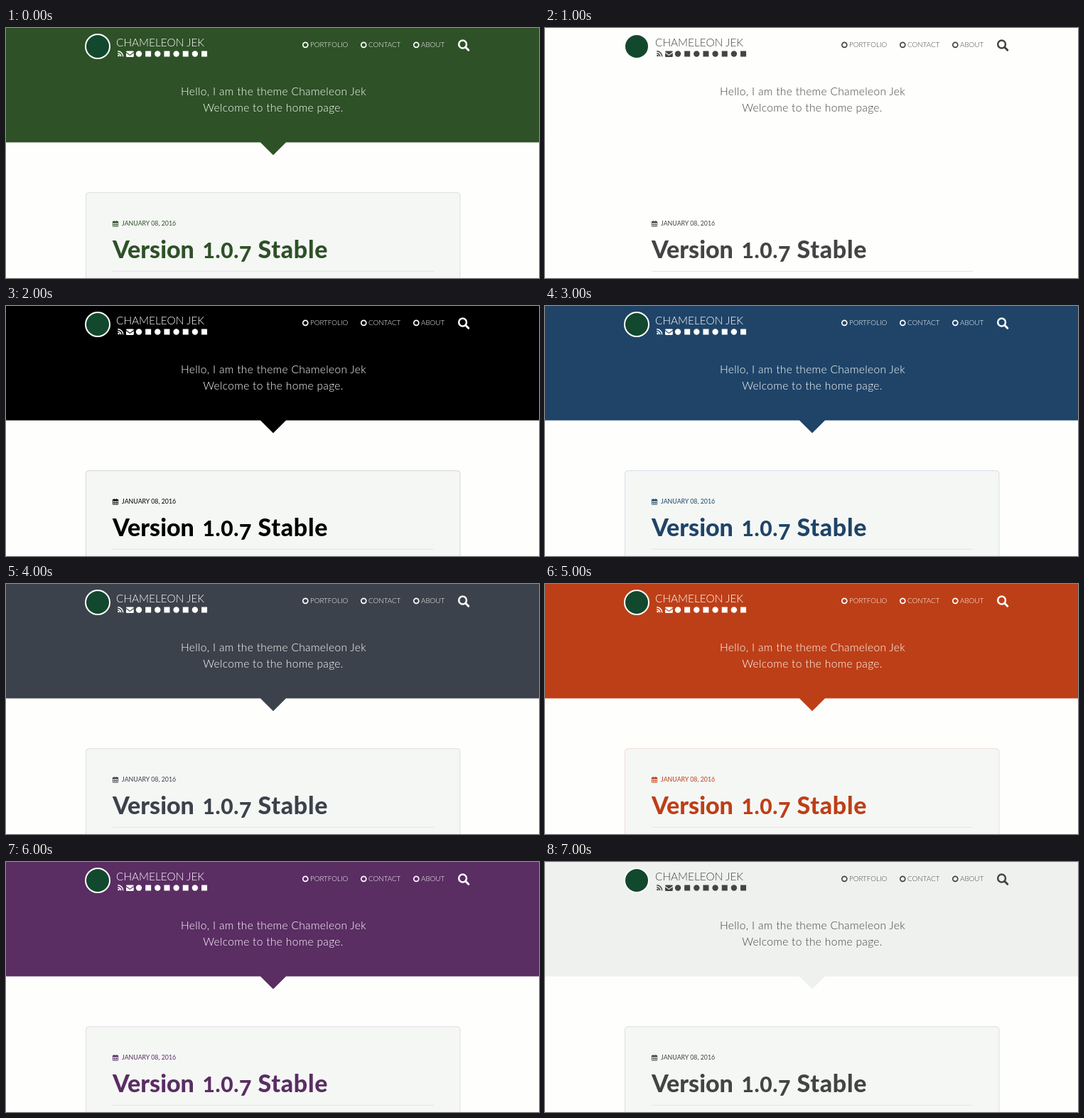
Write an HTML page that moves like this. It is 750 by 353 pixels and loops after 8 s.

```html
<!DOCTYPE html>
<html lang="en">
<head>
<meta charset="utf-8">
<title>Theme colours</title>
<style>
  html, body { margin: 0; width: 100%; height: 100%; overflow: hidden; background: #fefefd; }
  svg { display: block; width: 100%; height: 100%; font-family: Lato, sans-serif; font-weight: 300; }
  .band { fill: var(--band); }
  .ink { fill: var(--ink); }
  .line { fill: none; stroke: var(--ink); }
  .accent { fill: var(--accent); }
  .accent-line { fill: none; stroke: var(--accent); }
  .card { fill: #f5f7f5; stroke: var(--accent); stroke-opacity: .14; }
  .intro { font-size: 15.6px; letter-spacing: .3px; text-anchor: middle; }
  .nav { font-size: 9.8px; }
  .heading { font-size: 34px; font-weight: 800; }
</style>
</head>
<body>
<svg id="page" viewBox="0 0 750 353">
  <rect width="750" height="353" fill="#fefefd"/>
  <path class="band" d="M0 0H750V161.5H394L376 179.5L358 161.5H0Z"/>

  <circle cx="129" cy="26" r="17" fill="#12482d" stroke="#fff" stroke-width="2"/>
  <text class="ink" x="155" y="25.5" font-size="15.4">CHAMELEON JEK</text>

  <g id="icons" class="ink">
    <circle cx="158.5" cy="39" r="1.3"/>
    <path class="line" stroke-width="1.5" d="M157.2 35.8a4.5 4.5 0 0 1 4.5 4.5M157.2 32.8a7.5 7.5 0 0 1 7.5 7.5"/>
    <path d="M169 33.8q0-1.3 1.3-1.3h8.2q1.3 0 1.3 1.3l-5.4 3.9ZM169 35.2l5.4 3.9l5.4-3.9v4.5q0 1.3-1.3 1.3h-8.2q-1.3 0-1.3-1.3Z"/>
  </g>

  <g id="nav" class="ink nav"></g>
  <circle class="line" cx="642.6" cy="23" r="5.4" stroke-width="2.5"/>
  <path class="line" stroke-width="3" stroke-linecap="round" d="M647 27.5l3.8 3.8"/>

  <g class="ink intro">
    <text x="376.5" y="95">Hello, I am the theme Chameleon Jek</text>
    <text x="376" y="118">Welcome to the home page.</text>
  </g>

  <rect id="card" class="card" x="112.5" y="232.5" width="526.5" height="140" rx="4"/>
  <rect class="accent" x="150" y="273" width="8" height="2.2"/>
  <path class="accent-line" stroke-width=".8" d="M150.4 273.4h7.2v6.8h-7.2ZM152.8 275v5M155.2 275v5M150.4 277.7h7.2M152.3 271.8v2M155.7 271.8v2"/>
  <text class="accent" x="163" y="279.3" font-size="8.8" font-weight="400">JANUARY 08, 2016</text>
  <text class="accent heading" y="325"
    ><tspan x="150">Version</tspan> <tspan x="276.5" font-size="30" letter-spacing=".6">1.0.<tspan dy="5">7</tspan></tspan> <tspan x="354.5" dy="-5" letter-spacing=".7">Stable</tspan></text>
  <path d="M150 343.5H602" stroke="#e4e6e4"/>
</svg>
<script>
const page = document.getElementById("page");
const STEP = 1000;
const theme = (band, accent = band, ink = "#fff") => ({ band, accent, ink });
const themes = [
  theme("#2e5127"),
  theme("#fefefd", "#444", "#444"),
  theme("#000"),
  theme("#1f4468"),
  theme("#3c424b"),
  theme("#bd3f17"),
  theme("#5a2d63"),
  theme("#eff1ef", "#444", "#444"),
];
const PLAIN = 1;

function add(parent, tag, attributes, text = "") {
  const node = document.createElementNS("http://www.w3.org/2000/svg", tag);
  for (const name in attributes) node.setAttribute(name, attributes[name]);
  node.textContent = text;
  document.getElementById(parent).append(node);
}

// Plain marks for the social links, spaced evenly after the envelope.
[..."osososos"].forEach((shape, i) => {
  const x = 187 + i * 13.15;
  if (shape === "o") add("icons", "circle", { cx: x, cy: 36.5, r: 4.2 });
  else add("icons", "rect", { x: x - 4, y: 32.5, width: 8, height: 8 });
});

[["PORTFOLIO", 428], ["CONTACT", 510], ["ABOUT", 584]].forEach(([label, x]) => {
  add("nav", "circle", { class: "line", cx: x - 6.7, cy: 23.8, r: 3.5, "stroke-width": 1.7 });
  add("nav", "text", { x, y: 27 }, label);
});

const start = performance.now();
function draw(now) {
  const index = Math.floor(Math.max(0, now - start) / STEP) % themes.length;
  for (const [name, color] of Object.entries(themes[index])) page.style.setProperty("--" + name, color);
  document.getElementById("card").style.display = index === PLAIN ? "none" : "";
  requestAnimationFrame(draw);
}
draw(start);
</script>
</body>
</html>
```
